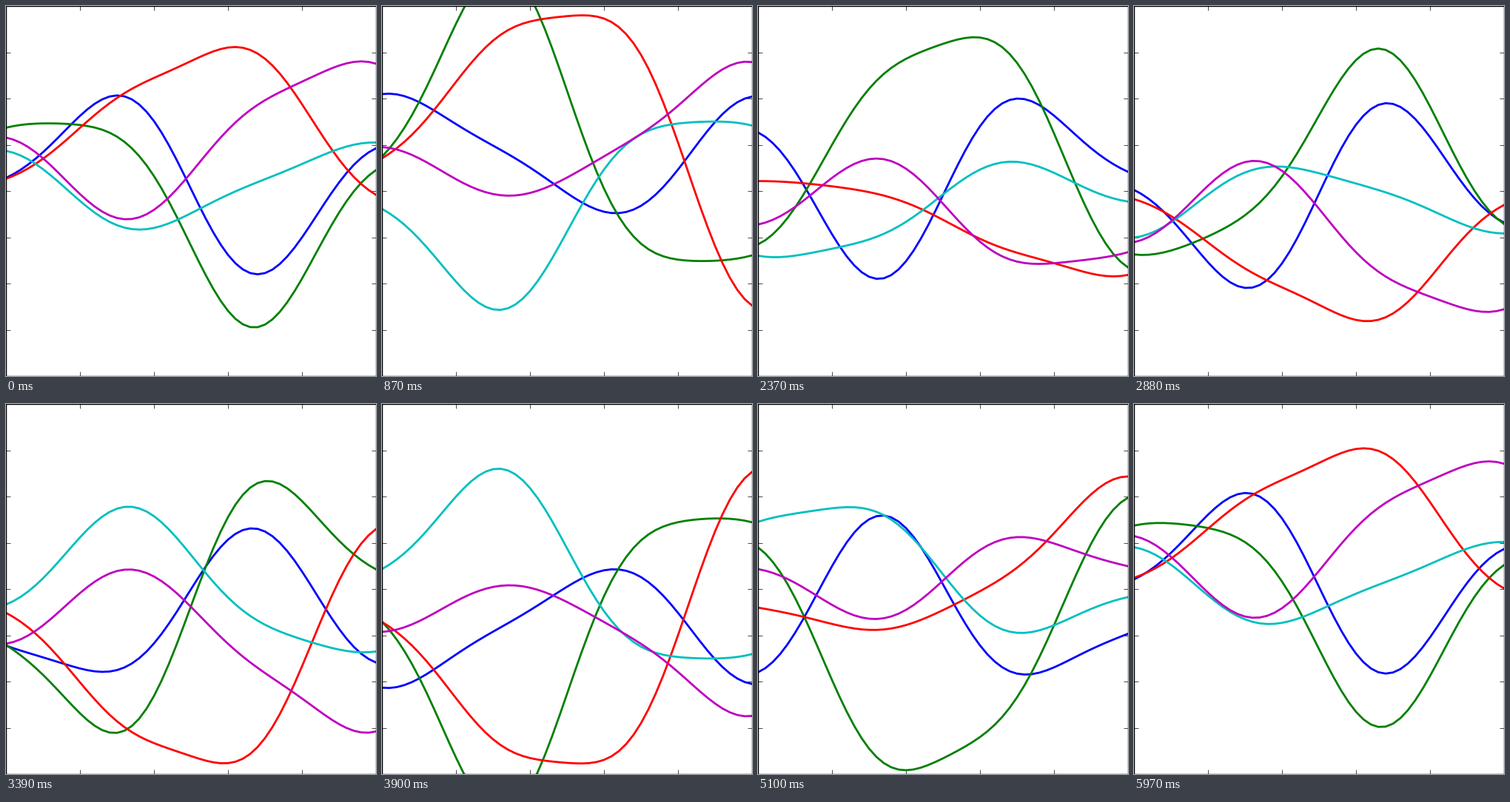
These frames come from a looping animation (500 by 500 pixels, 6 s). A matplotlib script:

```python
import numpy as np
import matplotlib.pyplot as plt
from matplotlib.animation import FuncAnimation

FRAMES, INTERVAL = 200, 30

# Each curve is a sum of four evenly spaced Gaussian bumps. A bump's height
# turns once per loop: real part at the start, imaginary a quarter later.
HEIGHTS = {
    "b": [-0.03 + 2.56j, 2.32 - 0.95j, -2.27 + 0.72j, 1.23 + 1.77j],
    "g": [1.20 - 0.84j, 1.25 + 5.32j, -3.24 + 0.78j, 0.89 - 2.22j],
    "r": [0.02 + 0.37j, 1.79 + 2.35j, 2.85 + 2.00j, -0.47 - 3.34j],
    "c": [1.00 - 0.80j, -0.97 - 2.69j, 0.14 + 1.47j, 1.03 + 0.78j],
    "m": [1.29 + 0.26j, -1.00 + 0.35j, 1.58 - 0.28j, 2.54 + 1.43j],
}

x = np.linspace(0, 5, 51)
centers = np.linspace(0, 5, 4)
width = centers[1] / 2
bumps = np.exp(-0.5 * ((x[:, None] - centers) / width) ** 2)

fig = plt.figure(figsize=(5, 5), dpi=100, facecolor="white")
ax = fig.add_axes([0, 0, 1, 1])
ax.set(xlim=(0, 5), ylim=(-4, 4), xticks=range(6), yticks=range(-4, 5))
ax.tick_params(direction="in", length=4, width=0.5, color="black",
               top=True, right=True, labelbottom=False, labelleft=False)
for spine in ax.spines.values():
    spine.set_linewidth(1)

waves = [(ax.plot(x, 0 * x, color=color, lw=2)[0], bumps @ np.array(heights))
         for color, heights in HEIGHTS.items()]


def update(i):
    turn = np.exp(-2j * np.pi * i / FRAMES)
    for line, wave in waves:
        line.set_ydata((wave * turn).real)
    return [line for line, _ in waves]


anim = FuncAnimation(fig, update, frames=FRAMES, interval=INTERVAL,
                     repeat=True, repeat_delay=0)
plt.show()
```
